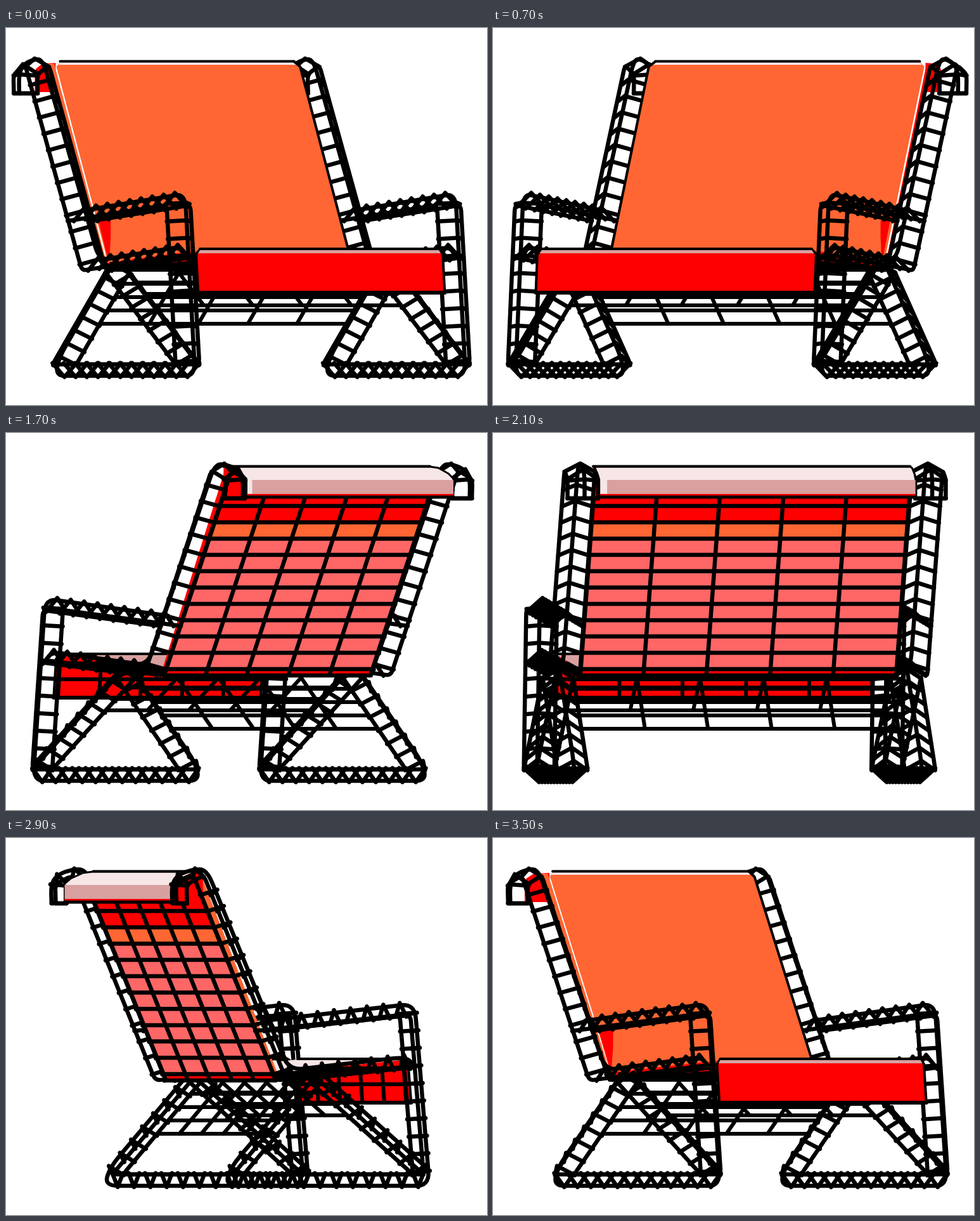
Recreate the animation shown at these times as an HTML page with a canvas. Size 759 by 594 pixels, loop 3600 ms.

```html
<!DOCTYPE html>
<html lang="en">
<head>
<meta charset="utf-8">
<title>Rotating chair</title>
<style>
html, body { margin: 0; width: 100%; height: 100%; overflow: hidden; background: #fff; }
canvas { display: block; }
</style>
</head>
<body>
<canvas id="stage" width="759" height="594"></canvas>
<script>
const ctx = document.getElementById('stage').getContext('2d');
const ORANGE = '#ff6633', RED = '#ff0000', CORAL = '#ff6666';
const ROSE = '#d9a0a0', PALE = '#f7e6e6', INK = '#000';
const SIDE = 278.5;   // centre of each side frame
const HALF = 24.5;    // half the distance of the paired rails
const EDGE = 254;     // half the cushion width
const DEPTH = 17;     // height of the truss
const TUBE = 6.5;     // line width of rails and rungs
const STRIPS = [-253, -152, -51, 51, 152, 253];

let cos = 1, sin = 0;

// Points are (u: sideways, f: forward, y: screen height).
const px = (u, f) => 379.5 + u * cos - f * sin;
const lerp = (a, b, t) => a + (b - a) * t;
const mix = (a, b, t) => [lerp(a[0], b[0], t), lerp(a[1], b[1], t)];

function toward(a, b, r) {
  const d = Math.hypot(b[0] - a[0], b[1] - a[1]);
  return mix(a, b, Math.min(r / d, 0.5));
}

function stroke(width) {
  ctx.strokeStyle = INK;
  ctx.lineWidth = width;
  ctx.stroke();
}

function line(points, width) {
  ctx.beginPath();
  for (const [u, f, y] of points) ctx.lineTo(px(u, f), y);
  stroke(width);
}

function poly(points, fill, width) {
  ctx.beginPath();
  for (const [u, f, y] of points) ctx.lineTo(px(u, f), y);
  ctx.closePath();
  ctx.fillStyle = fill;
  ctx.fill();
  if (width) stroke(width);
}

const sidePoly = (u, profile, fill) =>
  poly(profile.map(([f, y]) => [u, f, y]), fill);

const bar = (f, y, width, reach = EDGE) => line([[-reach, f, y], [reach, f, y]], width);

// Polyline with rounded corners in one side plane
function rail(u, pts, r) {
  ctx.beginPath();
  ctx.moveTo(px(u, pts[0][0]), pts[0][1]);
  for (let i = 1; i < pts.length - 1; i++) {
    const a = toward(pts[i], pts[i - 1], r), b = toward(pts[i], pts[i + 1], r);
    ctx.lineTo(px(u, a[0]), a[1]);
    ctx.quadraticCurveTo(px(u, pts[i][0]), pts[i][1], px(u, b[0]), b[1]);
  }
  const end = pts[pts.length - 1];
  ctx.lineTo(px(u, end[0]), end[1]);
  stroke(TUBE);
}

const rung = (u, a, b) =>
  line([[u - HALF, ...a], [u, ...b], [u + HALF, ...a]], TUBE);

// V-shaped rungs across the truss, ending just outside the rails
function rungs(u, a, b, n, side) {
  const df = b[0] - a[0], dy = b[1] - a[1];
  const k = side / Math.hypot(df, dy);
  const shift = (p, d) => [p[0] - dy * k * d, p[1] + df * k * d];
  for (let i = 0; i <= n; i++) {
    const p = mix(a, b, i / n);
    rung(u, shift(p, -2), shift(p, DEPTH + 3));
  }
}

const backF = y => -162 + 0.43 * (y - 105);
const frontF = y => -167 + 0.41 * (y - 62);
const rearLegF = y => -115 + (530 - y) * 0.9;
const foreLegF = y => 187 - (530 - y) * 1.19;

const PAIRS = [
  [[172, 361], [-43, 382], [-182, 59], [-211, 73], [-210, 103]],
  [[-78, 304], [165, 279], [187, 530], [-115, 530], [15, 385]],
  [[187, 530], [15, 385]]
];
const SINGLES = [
  [[178, 356], [166, 345], [-30, 366], [-168, 50], [-190, 49], [-217, 58], [-227, 74], [-226, 103]],
  [[-72, 288], [181, 261], [206, 548], [-137, 548], [-128, 519], [0, 376]],
  [[198, 517], [30, 376]]
];

function sideFrame(u) {
  for (const p of PAIRS) {
    rail(u - HALF, p, 9);
    rail(u + HALF, p, 9);
  }
  for (const p of SINGLES) rail(u, p, 23);
  rungs(u, [backF(372), 372], [backF(89.3), 89.3], 11, 1);
  rungs(u, [165, 361.7], [-28, 380.5], 7, 1);
  rungs(u, [158, 279.7], [-63, 302.5], 8, 1);
  rungs(u, [165, 277], [186.6, 526], 9, -1);
  rungs(u, [187, 530], [-115, 530], 11, -1);
  rungs(u, [-115, 530], [15, 385], 7, -1);
  rungs(u, [187, 530], [15, 385], 8, 1);
  rung(u, [-182, 61], [-188, 48]);
  rung(u, [-208, 73], [-217, 57]);
  rung(u, [-211, 75], [-228, 73]);
  rung(u, [-210, 103], [-226, 103]);
  line([[u - HALF, -210, 103], [u + HALF, -210, 103]], TUBE);
}

function legGrid(legF, low, step, count) {
  for (let i = 0; i < count; i++) bar(legF(low - i * step), low - i * step, 6);
  for (const u of STRIPS.slice(1, 5)) line([[u, legF(low), low], [u, legF(385), 385]], 6);
}

const rearGrid = () => legGrid(rearLegF, 466, 21, 4);
const foreGrid = () => legGrid(foreLegF, 437, 18, 3);

function seatGrid() {
  for (let i = 0; i <= 8; i++) bar(lerp(-43, 172, i / 8), lerp(382, 362, i / 8), 4);
}

function seatSide(u) {
  sidePoly(u, [[178, 351], [-42, 370], [-42, 380], [178, 366]], RED);
}

function seatTop() {
  poly([[-EDGE, 178, 349], [EDGE, 178, 349], [EDGE, -42, 370], [-EDGE, -42, 370]],
    Math.abs(sin) > 0.85 ? PALE : ROSE);
  bar(178, 348, 4);
}

// Upright panel at the front of the seat
function seatPanel(fromFront) {
  const e = EDGE, r = 8;
  poly([[-e, 184, 416], [-e, 179, 356], [-e + r, 179, 349], [e - r, 179, 349],
    [e, 179, 356], [e, 184, 416]], RED, 4);
  if (fromFront) {
    poly([[-e + 4, 179, 355], [-e + r, 179, 350], [e - r, 179, 350], [e - 4, 179, 355]], ROSE);
    bar(179, 348, 4, e - r);
  } else {
    for (const u of STRIPS) line([[u, 172, 362], [u, 176, 416]], 6);
    bar(176, 388, 6);
  }
  bar(184, 417, 6);
}

function headSide(u) {
  sidePoly(u, [[-166, 55], [-198, 56], [-214, 64], [-217, 76], [-217, 101], [-165, 101]], RED);
}

function backSide(near) {
  sidePoly(near * EDGE,
    [[frontF(56), 56], [frontF(372), 372], [backF(372) - 2, 372], [backF(56) - 2, 56]],
    near > 0 ? RED : ORANGE);
}

function backFront(near) {
  const e = EDGE - 3, top = frontF(54);
  poly([[-e, frontF(61), 61], [-e + 10, top, 53], [e - 10, top, 53], [e, frontF(61), 61],
    [e, frontF(372), 372], [-e, frontF(372), 372]], ORANGE);
  poly([[-e + 6, top, 58], [-e + 10, top, 54], [e - 10, top, 54], [e - 6, top, 58]], PALE);
  line([[-near * (e - 10), top, 53], [-near * e, frontF(61), 61], [-near * e, frontF(372), 372]], 4);
  bar(top, 52.5, 4, e - 10);
  sidePoly(near * 242, [[-78, 296], [-45, 303], [-45, 330], [-48, 362], [-52, 364]], RED);
}

function band(y1, y2, fill) {
  const a = backF(y1), b = backF(y2);
  poly([[-EDGE, a, y1], [EDGE, a, y1], [EDGE, b, y2], [-EDGE, b, y2]], fill);
}

function backRear() {
  band(60, 141, RED);
  band(141, 166, ORANGE);
  band(166, 371, CORAL);
  band(371, 381, RED);
  for (let i = 0; i <= 10; i++) {
    const y = 372 - i * 25.7;
    bar(backF(y), y, TUBE);
  }
  for (const u of STRIPS) line([[u, backF(101), 101], [u, backF(378), 378]], TUBE);
  bar(-43, 382, TUBE);
}

function headRear(near) {
  const e = EDGE, f = -213, inner = near * (e - 14);
  const edge = [[f, 99], [f, 72], [-203, 64], [-182, 55], [-165, 53]];
  const half = s => edge.map(([d, y]) => [s * e, d, y]);
  poly([...half(-1), ...half(1).reverse()], PALE, 3);
  poly([[-near * e, f, 74], [inner, f, 74], [inner, f, 97], [-near * e, f, 97]], ROSE);
  poly([[-e, f, 96], [e, f, 96], [e, f, 100], [-e, f, 100]], RED);
  bar(-165, 52.5, 4);
  bar(f, 101, 5);
}

function drawFront(near) {
  rearGrid();
  foreGrid();
  headSide(near * EDGE);
  backSide(near);
  backFront(near);
  seatGrid();
  seatSide(near * EDGE);
  seatPanel(true);
}

function drawRear(near) {
  seatPanel(false);
  foreGrid();
  seatGrid();
  seatTop();
  rearGrid();
  backSide(near);
  backRear();
  headSide(near * EDGE);
  headRear(near);
}

function draw(step) {
  const angle = (step * 10 - 40) * Math.PI / 180;
  cos = Math.cos(angle);
  sin = Math.sin(angle);
  const near = sin >= 0 ? 1 : -1;
  ctx.fillStyle = '#fff';
  ctx.fillRect(0, 0, 759, 594);
  ctx.lineCap = ctx.lineJoin = 'round';
  sideFrame(-near * SIDE);
  (cos >= 0 ? drawFront : drawRear)(near);
  sideFrame(near * SIDE);
}

function tick() {
  draw(Math.floor(performance.now() / 100) % 36);
  requestAnimationFrame(tick);
}
tick();
</script>
</body>
</html>
```
